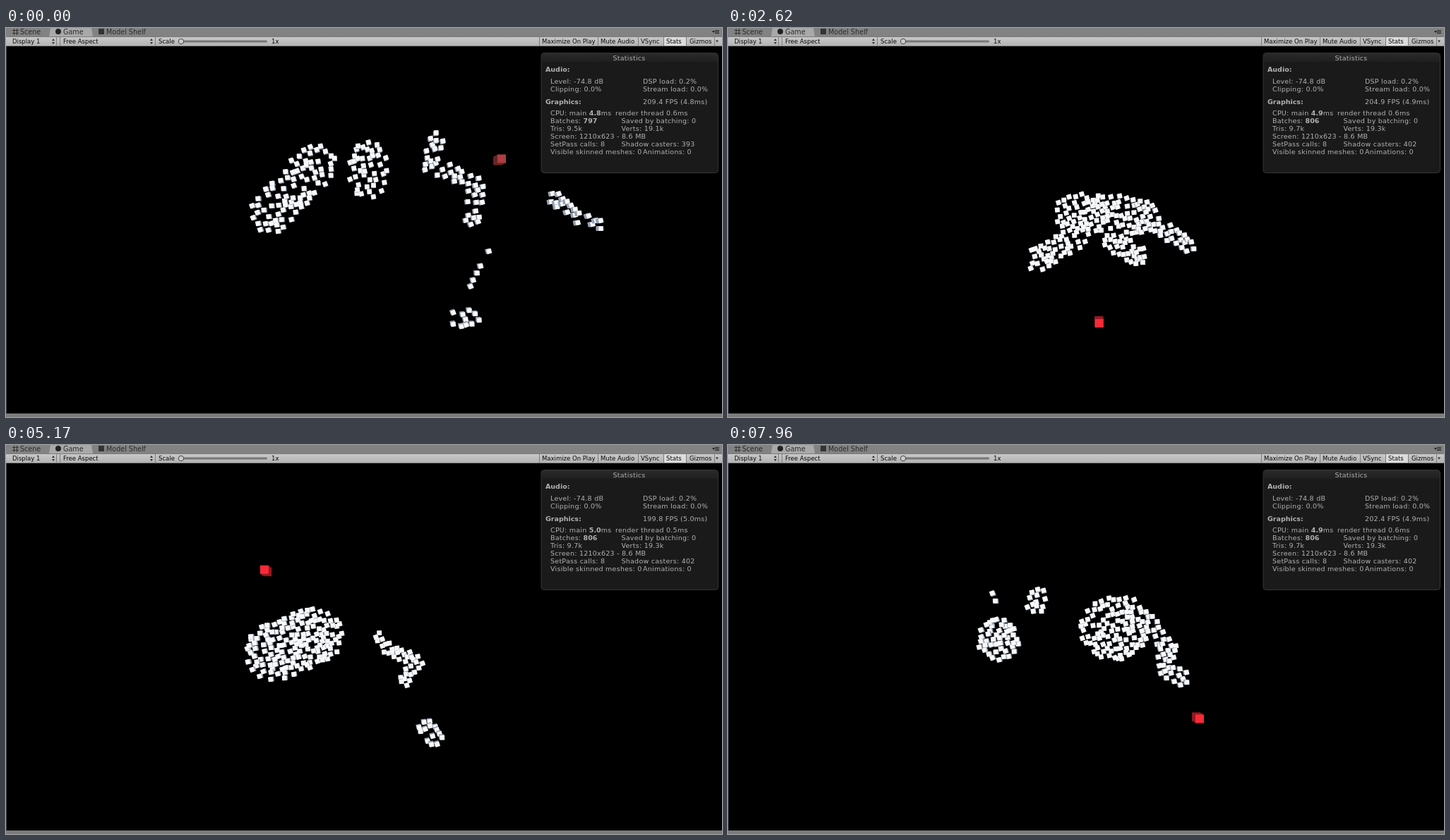
An HTML page with a canvas that plays this animation: 1014 px wide and 552 px high, repeating every 8000 ms.

```html
<!DOCTYPE html>
<html lang="en">
<head>
<meta charset="utf-8">
<title>Flock</title>
<style>
html, body { margin: 0; width: 100%; height: 100%; overflow: hidden; background: #000; }
svg, canvas { position: absolute; left: 0; top: 0; }
text { font-family: "DejaVu Sans", sans-serif; font-size: 9.6px; white-space: pre; }
.bar text { font-size: 8.5px; fill: #0a0a0a; }
.tabs text { fill: #2b2b2b; }
.stats text { fill: #b2b2b2; font-size: 9.5px; letter-spacing: .25px; }
.stats .b { font-weight: bold; letter-spacing: 0; }
</style>
</head>
<body>
<svg width="1014" height="552" viewBox="0 0 1014 552">
  <defs>
    <linearGradient id="tool" x2="0" y2="1"><stop stop-color="#cacaca"/><stop offset="1" stop-color="#b2b2b2"/></linearGradient>
    <linearGradient id="head" x2="0" y2="1"><stop stop-color="#2a2a2a"/><stop offset="1" stop-color="#1f1f1f"/></linearGradient>
  </defs>
  <rect width="1014" height="552" fill="#000"/>
  <g class="tabs">
    <rect width="1014" height="12" fill="#828282"/>
    <path d="M61 12L63 0H121L123 12Z" fill="#a9a9a9"/>
    <path d="M11.5 1V10M15.5 1V10M9 3.5H18M9 7.5H18" stroke="#333"/>
    <circle cx="74" cy="5" r="4" fill="#222"/>
    <rect x="131" y="1" width="8" height="8" fill="#333"/>
    <text x="20" y="8.5">Scene</text><text x="81" y="8.5">Game</text><text x="142" y="8.5">Model Shelf</text>
    <path d="M1000 4h4l-2 3z" fill="#222"/>
    <path d="M1004 3.5h6M1004 5.5h6M1004 7.5h6" stroke="#222"/>
  </g>
  <g class="bar">
    <rect y="12" width="1014" height="14" fill="url(#tool)"/>
    <rect x="932" y="12" width="31" height="13" fill="#dcdcdc"/>
    <path d="M0 12.5H1014M0 25.5H1014M71.5 12V26M76.5 12V26M211.5 12V26M755.5 12V26M838.5 12V26M895.5 12V26M931.5 12V26M963.5 12V26M1003.5 12V26" stroke="#7d7d7d"/>
    <path d="M65 18l2-3 2 3zM65 20l2 3 2-3zM204 18l2-3 2 3zM204 20l2 3 2-3zM1005 17.5h4l-2 3z" fill="#333"/>
    <rect x="248" y="17.5" width="122" height="3" rx="1.5" fill="#777"/>
    <circle cx="248" cy="19" r="3.7" fill="#ccc" stroke="#444"/>
    <text x="9" y="22">Display 1</text><text x="81" y="22">Free Aspect</text>
    <text x="216" y="22">Scale</text><text x="376" y="22">1x</text>
    <text x="759" y="22">Maximize On Play</text><text x="842" y="22">Mute Audio</text>
    <text x="899" y="22">VSync</text><text x="935" y="22">Stats</text><text x="968" y="22">Gizmos</text>
  </g>
  <path d="M.5 26V548" stroke="#444"/>
  <rect y="547" width="1014" height="5" fill="#7c7c7c"/>
  <g class="stats">
    <rect x="758" y="35.5" width="250.5" height="170" rx="4" fill="#1a1a1a" stroke="#363636"/>
    <path d="M758.5 48V39q0-3 3-3H1005q3 0 3 3V48Z" fill="url(#head)"/>
    <text x="882.5" y="45.5" text-anchor="middle">Statistics</text>
    <text x="764" y="61.5" class="b">Audio:</text>
    <text x="771" y="78.5">Level: -74.8 dB</text><text x="902" y="78.5">DSP load: 0.2%</text>
    <text x="771" y="89.5">Clipping: 0.0%</text><text x="902" y="89.5">Stream load: 0.0%</text>
    <text x="764" y="107.5" class="b">Graphics:</text><text x="902" y="107.5" id="fps"></text>
    <text x="771" y="123.5">CPU: main <tspan class="b" id="cpu"></tspan>ms</text>
    <text x="863" y="123.5" id="thread"></text>
    <text x="771" y="134.5">Batches: <tspan class="b" id="batches"></tspan></text>
    <text x="871.5" y="134.5">Saved by batching: 0</text>
    <text x="771" y="145.5" id="tris"></text><text x="871.5" y="145.5" id="verts"></text>
    <text x="771" y="156.5">Screen: 1210x623 - 8.6 MB</text>
    <text x="771" y="167.5">SetPass calls: 8</text><text x="871.5" y="167.5" id="casters"></text>
    <text x="771" y="178.5">Visible skinned meshes: 0</text><text x="902" y="178.5">Animations: 0</text>
  </g>
</svg>
<canvas id="view" width="1014" height="552"></canvas>
<script>
const LOOP = 8000, STEP = 79.4, COUNT = 200, CENTER = [507, 287];
const ctx = document.getElementById('view').getContext('2d');
const keys = [];

let seed = 7;
const random = () => (seed = seed * 16807 % 2147483647) / 2147483647;
const between = (a, b) => a + (b - a) * random();
const gap = (a, b) => (a[0] - b[0]) ** 2 + (a[1] - b[1]) ** 2;

// Splits a limb (radius, then x,y along its spine) into round-ended segments.
function segments([r, ...xy]) {
  const list = [];
  for (let i = 0; i + 3 < xy.length; i += 2) {
    const [x, y, x2, y2] = xy.slice(i, i + 4), len = Math.hypot(x2 - x, y2 - y);
    list.push({ r, x, y, len, ux: (x2 - x) / len, uy: (y2 - y) / len, area: (len + 2 * r + 6) * (2 * r + 6) });
  }
  return list;
}

function randomPoint(parts) {
  let pick = random() * parts.reduce((sum, p) => sum + p.area, 0), a, b, over;
  const p = parts.find(p => (pick -= p.area) <= 0);
  do {
    a = between(-p.r, p.len + p.r);
    b = between(-p.r, p.r);
    over = Math.max(-a, 0, a - p.len);
  } while (Math.hypot(over, b) > p.r);
  return [p.x + p.ux * a - p.uy * b, p.y + p.uy * a + p.ux * b];
}

// Fills the limbs with loosely even points: the loneliest of a few candidates wins.
function scatter(limbs) {
  const parts = limbs.flatMap(segments), points = [];
  const room = c => Math.min(...points.map(p => gap(p, c)));
  while (points.length < COUNT) {
    const tries = Array.from({ length: 10 }, () => randomPoint(parts));
    points.push(tries.reduce((best, c) => room(c) > room(best) ? c : best));
  }
  return points.sort((a, b) => a[0] - b[0]);
}

// Swaps points until each cube travels a short way from its previous place.
function match(from, to) {
  for (let pass = 0, changed = true; changed && pass < 30; pass++) {
    changed = false;
    for (let i = 0; i < COUNT; i++) {
      for (let j = 0; j < i; j++) {
        if (gap(from[i], to[j]) + gap(from[j], to[i]) + 1e-6 < gap(from[i], to[i]) + gap(from[j], to[j])) {
          [to[i], to[j]] = [to[j], to[i]];
          changed = true;
        }
      }
    }
  }
}

// One key pose: its step, frame rate, place of the red cube and the limbs of the flock.
function pose(step, fps, leader, ...limbs) {
  const flock = scatter(limbs);
  if (keys.length) match(keys[keys.length - 1].flock, flock);
  keys.push({ step, fps, leader, flock });
}

pose(0, 209.4, [699, 187], [29, 376, 263, 438, 194], [27, 513, 189, 513, 216],
  [11, 609, 160, 601, 194, 630, 206, 666, 224, 660, 268], [12, 640, 412, 660, 412],
  [1, 686, 310, 658, 366], [8, 775, 240, 806, 268, 838, 280]);
pose(18, 208.8, [559.5, 257], [20, 374, 298, 430, 250, 460, 200], [22, 566, 216, 640, 228],
  [9, 650, 258, 700, 262, 733, 280], [12, 636, 270, 628, 312, 646, 312]);
pose(33, 204.9, [525.5, 417], [17, 440, 328, 495, 296], [26, 488, 260, 580, 266],
  [14, 545, 305, 580, 322], [11, 600, 276, 650, 308]);
pose(48, 197.8, [322, 378], [22, 412, 380, 440, 372], [32, 456, 336, 500, 334],
  [20, 520, 335, 550, 280], [9, 582, 326, 604, 312], [9, 622, 362, 634, 368]);
pose(65, 199.8, [368, 178.5], [40, 380, 294, 438, 270],
  [8, 530, 274, 540, 290, 584, 306, 564, 334], [12, 595, 402, 606, 414]);
pose(81, 201, [645, 178], [46, 414, 236, 468, 226], [11, 500, 232, 528, 234],
  [9, 557, 245, 558, 268, 546, 282], [12, 570, 378, 586, 376]);
pose(100, 202.4, [665.5, 387], [29, 383, 276, 386, 276], [12, 440, 216, 436, 229],
  [5, 378, 214, 380, 221], [44, 543, 262, 556, 258], [12, 600, 255, 622, 285, 620, 315, 640, 330]);

const tilts = Array.from({ length: COUNT }, () => between(-22, -2));

// Smooth curve through a value of the keys, without overshoot.
function curve(value, s) {
  const last = keys.length - 1;
  const at = j => value(keys[j]);
  const slope = j => (at(j + 1) - at(j)) / (keys[j + 1].step - keys[j].step);
  const tangent = j => {
    const a = slope(Math.max(j - 1, 0)), b = slope(Math.min(j, last - 1));
    return a * b > 0 ? 2 * a * b / (a + b) : 0;
  };
  let j = 0;
  while (j < last - 1 && s >= keys[j + 1].step) j++;
  const h = keys[j + 1].step - keys[j].step, u = (s - keys[j].step) / h, w = 1 - u;
  return at(j) * w * w * (1 + 2 * u) + at(j + 1) * u * u * (3 - 2 * u)
    + h * u * w * (w * tangent(j) - u * tangent(j + 1));
}
const place = (point, s) => [0, 1].map(axis => curve(k => point(k)[axis], s));

// A front face over its shaded side, which recedes towards the middle of the view.
function cube([x, y], size, degrees, depth, front, side) {
  const dx = (CENTER[0] - x) * depth, dy = (CENTER[1] - y) * depth;
  const layers = Math.ceil(Math.hypot(dx, dy));
  for (let k = layers; k >= 0; k--) {
    const f = k / Math.max(layers, 1) - 0.5;
    ctx.save();
    ctx.translate(x + dx * f, y + dy * f);
    ctx.rotate(degrees * Math.PI / 180);
    ctx.fillStyle = k ? side : front;
    ctx.fillRect(-size / 2, -size / 2, size, size);
    ctx.restore();
  }
}

function setText(id, text) {
  const node = document.getElementById(id);
  if (node.textContent !== text) node.textContent = text;
}

function showStats(s) {
  const rate = curve(k => k.fps, s), ms = (1000 / rate).toFixed(1);
  const added = Math.min(9, s), extra = Math.round(added / 4.5) / 10;
  setText('fps', `${rate.toFixed(1)} FPS (${ms}ms)`);
  setText('cpu', ms);
  setText('thread', `render thread ${s >= 60 && s < 70 ? '0.5' : '0.6'}ms`);
  setText('batches', `${797 + added}`);
  setText('casters', `Shadow casters: ${393 + added}`);
  setText('tris', `Tris: ${(9.5 + extra).toFixed(1)}k`);
  setText('verts', `Verts: ${(19.1 + extra).toFixed(1)}k`);
}

function draw(now) {
  const s = Math.min(100, Math.floor(now % LOOP / STEP));
  ctx.clearRect(0, 0, 1014, 552);
  tilts.forEach((tilt, i) =>
    cube(place(k => k.flock[i], s), 6.6, tilt, 0.012, '#f8f9fa', '#98a2b0'));
  const glow = Math.min(1, s / 18);
  const red = shade => `rgb(${[172 + 76 * glow, 62 - 20 * glow, 64 - 8 * glow].map(c => c * shade)})`;
  cube(place(k => k.leader, s), 12, 0, 0.031, red(1), red(0.6));
  showStats(s);
  requestAnimationFrame(draw);
}
requestAnimationFrame(draw);
</script>
</body>
</html>
```
